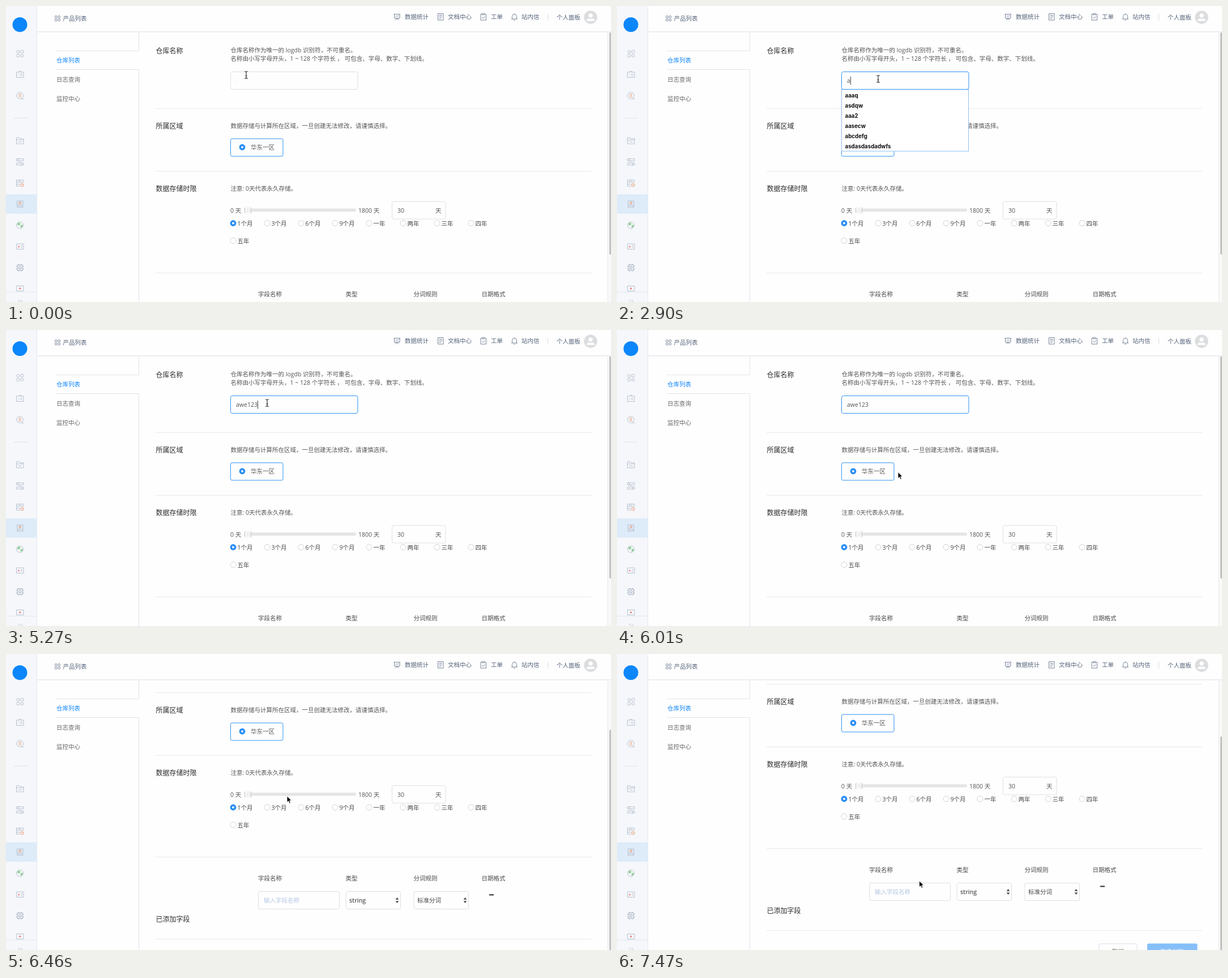
These frames come from a looping animation (1068x524 px, 8 s). An HTML page:

```html
<!DOCTYPE html>
<html lang="zh-CN">
<head>
<meta charset="utf-8">
<title>仓库列表</title>
<style>
html, body { margin: 0; width: 100%; height: 100%; overflow: hidden; background: #fefefe; }
svg { display: block; width: 100%; height: 100%; }
text { font: 10.5px "Open Sans", "Noto Sans CJK SC", "Noto Sans CJK", sans-serif; fill: #555; white-space: pre; }
.title { font-size: 12px; font-weight: 500; fill: #2b2b2b; }
.mid text, .mid { font-weight: 500; fill: #484848; }
.strong { font-weight: 600; }
.head text { fill: #56647a; }
.nav text { fill: #666; }
.nav .on { fill: #1186fb; font-weight: 500; }
.rule { stroke: #e7e8eb; }
.box { fill: #fefefe; stroke: #dcdfe4; }
.line { fill: none; stroke: #6c7a90; }
.side { fill: none; stroke: #b3bbc8; }
.warm { fill: none; stroke: #eba27e; }
.list text { font: 700 9.75px Inter, "Liberation Sans", sans-serif; fill: #111; }
.hint { fill: #b4c6e4; }

/* every change is a hard step on one 8 s clock */
.scroll, .thumb, .field, .typed, .caret, .list, .beam, .arrow { animation: 8s step-end infinite; }
.scroll { animation-name: scroll; }
.thumb { animation-name: thumb; }
.field { animation-name: focus; }
.typed { animation-name: type; }
.caret { animation-name: blink; }
.list { animation-name: list; }
.beam { animation-name: beam; }
.arrow { animation-name: arrow; }

@keyframes scroll {
  0% { transform: translateY(0); }
  78.875% { transform: translateY(-60px); }
  80.75% { transform: translateY(-113px); }
  83% { transform: translateY(-127px); }
  85.125%, 100% { transform: translateY(-128px); }
}
@keyframes thumb {
  0% { transform: translateY(0); }
  78.875% { transform: translateY(48px); }
  80.75% { transform: translateY(91px); }
  83% { transform: translateY(102px); }
  85.125%, 100% { transform: translateY(103px); }
}
@keyframes focus {
  0% { stroke: #dcdfe4; }
  8.125% { stroke: #8fc1f4; }
  10%, 100% { stroke: #2f92f6; }
}
@keyframes type {
  0% { transform: translateX(406px); }
  36.25% { transform: translateX(412px); }
  45.5% { transform: translateX(420px); }
  47.375% { transform: translateX(426px); }
  54.75% { transform: translateX(432px); }
  62.125% { transform: translateX(438px); }
  65.875%, 100% { transform: translateX(444px); }
}
@keyframes blink {
  0%, 13.75%, 26.875%, 41.75%, 52.875%, 60.375%, 71.5% { opacity: 0; }
  8.125%, 19.375%, 32.5%, 45.5%, 54.75%, 62.125%, 78.875%, 100% { opacity: 1; }
}
@keyframes list {
  0%, 45.5%, 100% { opacity: 0; }
  36.25% { opacity: 1; }
}
@keyframes beam {
  0% { transform: translate(424px, 122px); opacity: 1; }
  1.875% { transform: translate(451px, 127px); opacity: 1; }
  4.5% { transform: translate(461px, 129px); opacity: 1; }
  73.375%, 100% { transform: translate(461px, 129px); opacity: 0; }
}
@keyframes arrow {
  0% { transform: translate(488px, 222px); opacity: 0; }
  73.375% { transform: translate(488px, 222px); opacity: 1; }
  75.125% { transform: translate(496px, 251.5px); opacity: 1; }
  91.125% { transform: translate(523px, 363px); opacity: 1; }
  93.375%, 100% { transform: translate(533.5px, 401.5px); opacity: 1; }
}
</style>
</head>
<body>
<svg viewBox="0 0 1068 524">
<defs>
  <circle id="off" r="5" fill="#fff" stroke="#cfd2d6"/>
  <g id="on"><circle r="5.4" fill="#2a8ef5"/><circle r="1.9" fill="#fff"/></g>
  <path id="updown" d="M-2.8 -1.2L0 -5L2.8 -1.2ZM-2.8 1.2L0 5L2.8 1.2Z" fill="#444"/>
</defs>
<rect width="1068" height="524" fill="#fefefe"/>

<g class="scroll">
  <path class="rule" d="M264 181.5H1033M264 292.5H1033M264 472.5H1033M264 617.5H1033"/>

  <text class="title" x="264.5" y="83.5">仓库名称</text>
  <text x="396.5" y="82">仓库名称作为唯一的 logdb 识别符，不可重名。</text>
  <text x="396.5" y="97">名称由小写字母开头，1 ~ 128 个字符长 ， 可包含、字母、数字、下划线。</text>
  <rect class="box field" x="396.5" y="116.5" width="224.5" height="31" rx="3"/>
  <text x="406" y="136">awe123</text>
  <g class="typed">
    <rect x=".3" y="122" width="45" height="20" fill="#fefefe"/>
    <rect class="caret" y="125" width="1" height="14.5" fill="#444"/>
  </g>

  <text class="title" x="264.5" y="216.5">所属区域</text>
  <text x="396.5" y="215.5">数据存储与计算所在区域，一旦创建无法修改，请谨慎选择。</text>
  <rect class="box" x="396.5" y="235" width="92.5" height="31" rx="2.5" style="stroke:#2f92f6"/>
  <use href="#on" x="417" y="250"/>
  <text x="432" y="254">华东一区</text>

  <text class="title" x="264.5" y="327.5">数据存储时限</text>
  <text x="396.5" y="326.5">注意: 0天代表永久存储。</text>
  <text x="396" y="365.5">0 天</text>
  <rect x="421" y="358.5" width="197" height="5.5" rx="2.7" fill="#e5e5e6"/>
  <rect x="421" y="355.5" width="12" height="12" rx="2" fill="#f7f7f7"/>
  <path d="M426.5 358V365M429.5 358V365" stroke="#e2e2e2"/>
  <path d="M421.5 357V366M432.5 356.5V367" stroke="#c2c2c2"/>
  <text x="622" y="365.5">1800 天</text>
  <rect class="box" x="681.5" y="346" width="94.5" height="31" rx="2.5"/>
  <text x="691" y="365.5">30</text>
  <text x="758" y="365.5">天</text>
  <g class="mid">
    <use href="#on" x="401" y="384.5"/><text x="408.5" y="388.5">1个月</text>
    <use href="#off" x="461" y="384.5"/><text x="468.5" y="388.5">3个月</text>
    <use href="#off" x="521" y="384.5"/><text x="528.5" y="388.5">6个月</text>
    <use href="#off" x="581" y="384.5"/><text x="588.5" y="388.5">9个月</text>
    <use href="#off" x="641" y="384.5"/><text x="648.5" y="388.5">一年</text>
    <use href="#off" x="701" y="384.5"/><text x="708.5" y="388.5">两年</text>
    <use href="#off" x="761" y="384.5"/><text x="768.5" y="388.5">三年</text>
    <use href="#off" x="821" y="384.5"/><text x="828.5" y="388.5">四年</text>
    <use href="#off" x="401" y="415.5"/><text x="408.5" y="419.5">五年</text>
    <text x="445" y="513.5">字段名称</text>
    <text x="599.5" y="513.5">类型</text>
    <text x="719.5" y="513.5">分词规则</text>
    <text x="839.5" y="513.5">日期格式</text>
  </g>
  <rect class="box" x="445.5" y="533.5" width="143" height="31" rx="2.5"/>
  <text class="hint" x="455" y="552.5">输入字段名称</text>
  <rect class="box" x="600" y="533.5" width="96.5" height="31" rx="2.5"/>
  <text class="strong" x="606" y="552.5">string</text>
  <use href="#updown" x="690.5" y="549"/>
  <rect class="box" x="720" y="533.5" width="96.5" height="31" rx="2.5"/>
  <text class="mid" x="726" y="552.5">标准分词</text>
  <use href="#updown" x="810.5" y="549"/>
  <rect x="853" y="538.2" width="8" height="2.3" fill="#444"/>
  <text class="title" x="264.5" y="586.5">已添加字段</text>
  <rect class="box" x="851" y="641" width="67" height="30" rx="2.5"/>
  <text x="874" y="659">取消</text>
  <rect x="936" y="640.5" width="88.5" height="31" rx="2.5" fill="#86bff8"/>
  <text x="959" y="659" style="fill:#fff">确定创建</text>

  <g class="list">
    <rect x="396.5" y="147.5" width="224" height="109.5" fill="#fff" stroke="#8fbfee"/>
    <path d="M397 147.5H620" stroke="#2f92f6"/>
    <text x="402.5" y="161.7">aaaq</text>
    <text x="402.5" y="179.7">asdqw</text>
    <text x="402.5" y="197.7">aaa2</text>
    <text x="402.5" y="215.7">aasecw</text>
    <text x="402.5" y="233.7">abcdefg</text>
    <text x="402.5" y="251.7">asdasdasdadwfs</text>
  </g>
</g>

<rect x="1062" y="46" width="6" height="478" fill="#fafafa"/>
<path d="M1062.5 46V524" stroke="#e6e6e6"/>
<rect class="thumb" x="1065" y="43" width="5" height="397" rx="2" fill="#c1c1c1"/>

<g class="nav">
  <path class="rule" style="stroke:#e0e3e8" fill="none" d="M234.5 46V79.5H88M88 112.5H234.5V524"/>
  <text class="on" x="89" y="100">仓库列表</text>
  <text x="89" y="133.5">日志查询</text>
  <text x="89" y="167.5">监控中心</text>
</g>

<g class="head">
  <rect x="54" width="1014" height="46" fill="#fefefe"/>
  <path d="M54 45.5H1068" stroke="#e3e6eb"/>
  <path d="M54 46.5H1068" stroke="#f5f6f8"/>
  <g class="line" stroke-width=".9">
    <rect x="86.5" y="17.5" width="3.5" height="3.5" rx=".8"/><rect x="92" y="17.5" width="3.5" height="3.5" rx=".8"/>
    <rect x="86.5" y="23" width="3.5" height="3.5" rx=".8"/><rect x="92" y="23" width="3.5" height="3.5" rx=".8"/>
    <path d="M684.5 14.5H696M685.5 14.5V21.5H695V14.5M688 19L690 17L691.5 18.5L693.5 16.5M690.2 21.5V23M687 24.5L690.2 22.5L693.5 24.5"/>
    <path d="M762.5 13.5H772V25H762.5ZM764.5 16.5H770M764.5 19.2H770M764.5 22H768"/>
    <path d="M840 14.5H838V25H847.5V14.5H845.5M840.5 13.2H845V15.5H840.5ZM840.5 20L842.3 22L845.5 18.3"/>
    <path d="M892 23H903M893.5 23V18.5A4 4 0 0 1 901.5 18.5V23M897.5 14.5V13M896 25H899"/>
  </g>
  <text x="100.5" y="26">产品列表</text>
  <text x="704" y="23">数据统计</text>
  <text x="780" y="23">文档中心</text>
  <text x="856" y="23">工单</text>
  <text x="910" y="23">站内信</text>
  <path d="M956.5 14V26" stroke="#d9dde3"/>
  <text x="972" y="24">个人面板</text>
  <circle cx="1032" cy="20" r="11.7" fill="#dcdddf"/>
  <circle cx="1032" cy="17" r="3.7" fill="#fff"/>
  <path d="M1024.5 26.5Q1025.5 22.5 1029 22Q1032 24 1035 22Q1038.5 22.5 1039.5 26.5Z" fill="#fff"/>
</g>

<rect width="54" height="524" fill="#f5f7fb"/>
<path d="M54.5 0V524" stroke="#e4e8ef"/>
<rect y="333.5" width="54" height="34" fill="#deebf8"/>
<circle cx="24.5" cy="33" r="13" fill="#0c86fb"/>
<path d="M14 198.5H37" stroke="#dde2ea"/>
<g class="side" stroke-width=".9">
  <circle cx="21.5" cy="81" r="2.4"/><rect x="26" y="78.5" width="4.8" height="4.8" rx="1"/>
  <rect x="19" y="85.5" width="4.8" height="4.8" rx="1"/><circle cx="28.5" cy="88" r="2.4"/>
  <path d="M18.5 117H31V126.5H18.5ZM21.5 122H23.5M25 120.5H28.5M25 123H28.5M23 115.5H27"/>
  <circle cx="24.5" cy="158.5" r="5.8"/><path d="M27 164.5H31.5"/>
  <path d="M18.5 233H23L24.5 235H31V244H18.5ZM18.5 237H31M22 240.5H27.5"/>
  <path d="M18.5 270.5H31V274H18.5ZM18.5 278H31V281.5H18.5ZM21.5 269V275.5M28 276.5V283M24.5 274V278"/>
  <path d="M18.5 308H30.5V312H18.5ZM18.5 312V319H25M18.5 315.5H25M21 310H27"/>
  <path d="M19.5 345H30V353H19.5ZM18.5 356H31M20.5 353V356M29 353V356"/>
  <circle cx="24.5" cy="388" r="6"/>
  <path d="M18.5 421H31V430.5H18.5ZM26 424.5H29M26 427H29"/>
  <path stroke="#98a3b5" d="M20 458.5H29.5V468H20ZM22.8 461.3H26.7V465.2H22.8ZM22.5 456.8V458.5M27 456.8V458.5M22.5 468V469.8M27 468V469.8M18.3 461H20M18.3 465.5H20M29.5 461H31.2M29.5 465.5H31.2"/>
  <path d="M18.5 495.5H31V504.5H18.5Z"/>
</g>
<g class="warm" stroke-width="1">
  <circle cx="24.5" cy="157" r="1.8"/><path d="M22 161.5Q24.5 158.5 27 161.5"/>
  <circle cx="28.5" cy="317" r="2.8"/><path d="M28.5 315.5V317H30"/>
  <circle cx="24.7" cy="348.5" r="1.8"/><path d="M22.5 352L27 346.5"/>
</g>
<path d="M20 385Q23 382.5 25 384Q26 387 22.5 388.5Q20 388 20 385ZM26 388Q30.5 386.5 29.5 390Q27.5 393.5 25.5 392Z" fill="#8fcf96"/>
<circle cx="22.5" cy="426" r="1.5" fill="#ec8585"/>
<path d="M23.5 498L27 500L23.5 502Z" fill="#e46a6a"/>
<rect y="506" width="54" height="18" fill="#f5f7fb"/>
<path d="M0 506.5H54" stroke="#e2e6ed"/>
<path class="side" d="M21 520L24.5 523.5L21 527M25.5 520L29 523.5L25.5 527"/>

<g class="beam" fill="none">
  <path id="bar" d="M-3 -6.3Q0 -6.3 0 -4.5Q0 -6.3 3 -6.3M0 -4.5V4.5M-3 6.3Q0 6.3 0 4.5Q0 6.3 3 6.3M-1.5 1.8H1.5" stroke="#fff" stroke-width="2.4"/>
  <use href="#bar" style="stroke:#222"/>
  <path d="M-3 -6.3Q0 -6.3 0 -4.5Q0 -6.3 3 -6.3M0 -4.5V4.5M-3 6.3Q0 6.3 0 4.5Q0 6.3 3 6.3M-1.5 1.8H1.5" stroke="#222" stroke-width="1.1"/>
</g>
<path class="arrow" d="M0 0V11.2L2.6 8.8L4.4 13L6.4 12.1L4.6 8.1H8.2Z" fill="#000" stroke="#fff" stroke-width=".9"/>
</svg>
</body>
</html>
```
